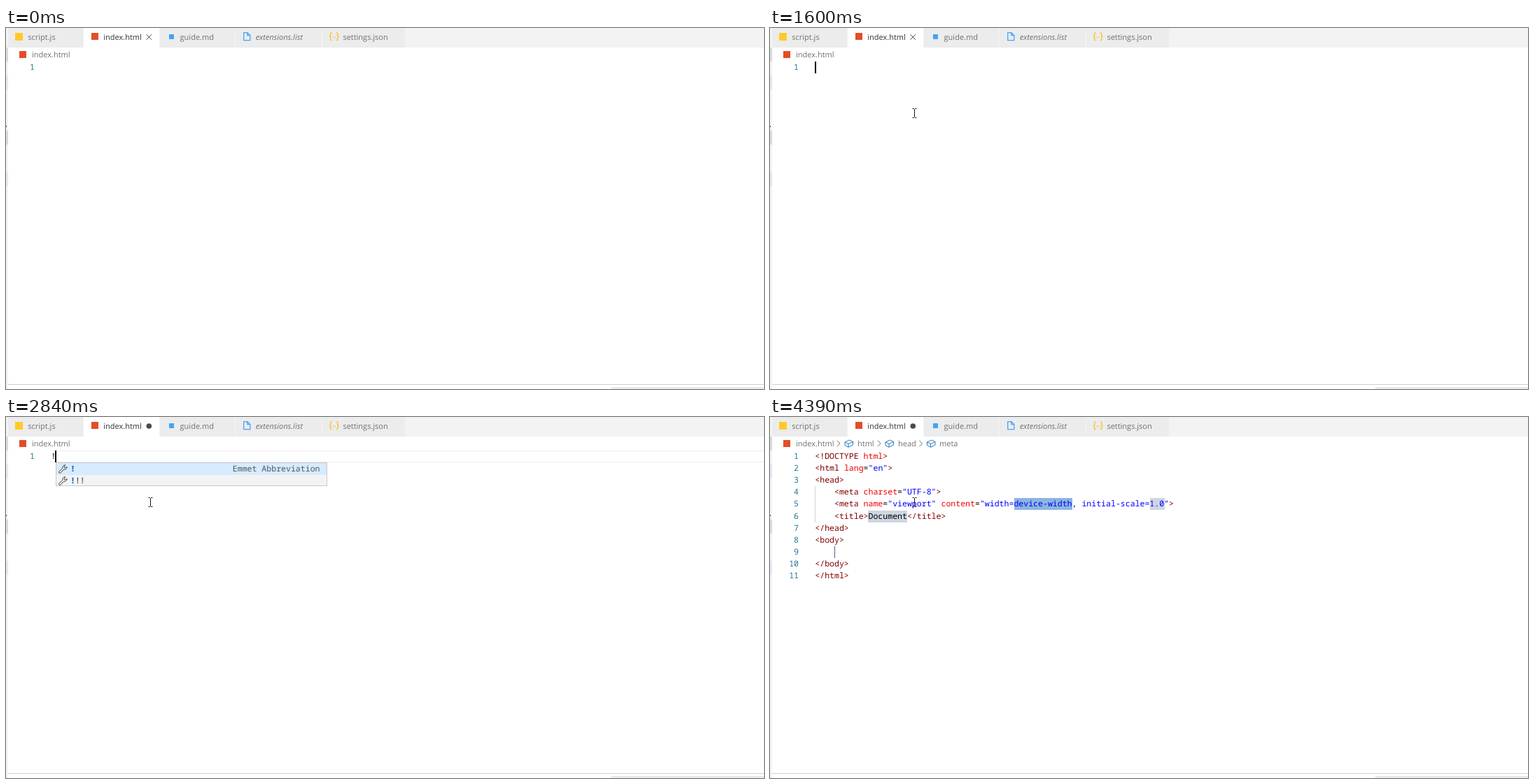
An HTML page that plays this animation: 1083x517 px, repeating every 4480 ms.

```html
<!DOCTYPE html>
<html lang="en">
<head>
<meta charset="UTF-8">
<title>Editor abbreviation</title>
<style>
html, body { margin: 0; width: 100%; height: 100%; overflow: hidden; background: #fff; }
svg { display: block; width: 1083px; height: 517px; }
text { text-rendering: geometricPrecision; white-space: pre; }
.ui { font: 11px "Open Sans", "Noto Sans", sans-serif; fill: #717171; }
.ui .on { fill: #333; }
.mono { font: 11.55px "Noto Sans Mono", "DejaVu Sans Mono", monospace; }
.nums { fill: #237893; text-anchor: end; }
.line { fill: none; stroke: #424242; }

.loop, .code text, .code tspan { animation: 4480ms step-end infinite; }
.caret { animation-name: caret; }
.pointer { animation-name: pointer; }
.click { animation-name: click; }
.close { animation-name: close; }
.dirty { animation-name: dirty; }
.typed { animation-name: typed; }
.suggest { animation-name: suggest; }
.page { animation-name: page; }
.crumbs { animation-name: crumbs; }

/* code is black until the highlighter catches up */
.code text, .code tspan { animation-name: tint; fill: var(--c); }
.code text { --c: #800000; }
.code .a { --c: #f00000; }
.code .v { --c: #0000ff; }
.code .p { --c: #000; }
@keyframes tint { 0% { fill: #000; } 89.5% { fill: var(--c); } }

@keyframes caret {
  0% { visibility: hidden; transform: translate(64px, 48px); }
  27.23% { visibility: visible; transform: translate(64px, 48px); }
  37.72% { visibility: hidden; transform: translate(64px, 48px); }
  49.99% { visibility: visible; transform: translate(64px, 48px); }
  60.26% { visibility: visible; transform: translate(70px, 48px); }
  72.54% { visibility: hidden; transform: translate(70px, 48px); }
  82.81% { visibility: visible; transform: translate(70px, 48px); }
  87.94% { visibility: visible; transform: translate(431px, 116px); }
  97.99%, 100% { visibility: hidden; transform: translate(431px, 116px); }
}
@keyframes pointer {
  0% { visibility: hidden; transform: translate(903px, 488px); }
  4.91% { visibility: visible; transform: translate(903px, 488px); }
  6.47% { transform: translate(700px, 394px); }
  8.25% { transform: translate(530px, 322px); }
  9.82% { transform: translate(469px, 299px); }
  16.96% { transform: translate(446px, 282px); }
  18.52% { transform: translate(385px, 238px); }
  20.31% { transform: translate(311px, 188px); }
  22.09% { transform: translate(252px, 150px); }
  23.66% { transform: translate(216px, 128px); }
  25.44% { transform: translate(203px, 121px); }
  35.71%, 100% { visibility: visible; transform: translate(207px, 122px); }
}
@keyframes click { 0% { visibility: hidden; } 27.23% { visibility: visible; } 29.01%, 100% { visibility: hidden; } }
@keyframes close { 0% { visibility: visible; } 60.26%, 100% { visibility: hidden; } }
@keyframes dirty { 0% { visibility: hidden; } 60.26%, 100% { visibility: visible; } }
@keyframes typed { 0% { visibility: hidden; } 60.26% { visibility: visible; } 87.94%, 100% { visibility: hidden; } }
@keyframes suggest { 0% { visibility: hidden; } 63.39% { visibility: visible; } 87.94%, 100% { visibility: hidden; } }
@keyframes page { 0% { visibility: hidden; } 87.94%, 100% { visibility: visible; } }
@keyframes crumbs { 0% { visibility: hidden; } 96.2%, 100% { visibility: visible; } }
</style>
</head>
<body>
<svg viewBox="0 0 1083 517">
  <defs>
    <path id="wrench" class="line" stroke-linejoin="round" d="M.8 10.2 5.9 5.2C5.2 2.6 7.4.3 10 .9L8 3l.4 1.7 1.7.4L12 3.2C12.5 5.7 10.2 7.8 7.9 7.1L2.8 12.1Q1.7 12.9.9 12 .1 11.1.8 10.2Z"/>
    <g id="crumb">
      <path class="line" style="stroke:#717171" d="M0 33.7 4 38 0 42.3"/>
      <path class="line" style="stroke:#2a7ab8" stroke-linejoin="round" d="M11 36 17.5 33 22.5 35.5V40L16 43.2 11 40.5ZM11 36 16 38.5 22.5 35.5M16 38.5V43.2"/>
    </g>
  </defs>

  <!-- tab bar -->
  <path fill="#f3f3f3" d="M0 0H1083V28H0Z"/>
  <path fill="#ececec" d="M3 0H110V28H3ZM220 0H327V28H220ZM328 0H451V28H328ZM452 0H570V28H452Z"/>
  <path fill="#fff" d="M111 0H219V28H111Z"/>

  <!-- sidebar edge -->
  <path fill="#f3f3f3" d="M0 28H3V517H0Z"/>
  <path fill="#dadada" d="M0 28H3V48H0ZM0 147H3V167H0Z"/>
  <path fill="#e4e6f1" d="M0 68H3V88H0ZM0 206H3V226H0Z"/>
  <path fill="#444" d="M0 140H1V142H0Z"/>

  <!-- bottom panel -->
  <path fill="#cfcfcf" d="M3 510H1083V511H3ZM865 515H1083V516H865Z"/>

  <!-- file icons -->
  <rect x="13" y="7" width="11" height="11" fill="#ffca28"/>
  <rect x="122" y="7" width="10" height="10" fill="#e44d26"/>
  <rect x="19" y="33" width="10" height="10" fill="#e44d26"/>
  <rect x="233" y="9" width="7" height="7" fill="#42a5f5"/>
  <path fill="none" stroke="#42a5f5" stroke-width="1.3" stroke-linejoin="round" d="M339.7 6.7H345L348.8 10.4V17.7H339.7ZM344.8 6.7V10.6H348.8"/>
  <g fill="none" stroke="#fbc02d" stroke-width="1.3">
    <path d="M465.5 7H464.7Q463.7 7 463.7 8.2V10.5Q463.7 12.3 461.8 12.3 463.7 12.3 463.7 14V16.2Q463.7 17.5 464.7 17.5H465.5"/>
    <path d="M472 7H472.8Q473.8 7 473.8 8.2V10.5Q473.8 12.3 475.7 12.3 473.8 12.3 473.8 14V16.2Q473.8 17.5 472.8 17.5H472"/>
    <path stroke-dasharray="1.3 1.5" d="M466.7 13.5H471.5"/>
  </g>

  <g class="ui">
    <text x="31.3" y="17">script.js</text>
    <text x="139.3" y="17" class="on">index.html</text>
    <text x="248.6" y="17">guide.md</text>
    <text x="356.8" y="17" font-style="italic">extensions.list</text>
    <text x="481.4" y="17">settings.json</text>
    <text x="37" y="42">index.html</text>
  </g>
  <path class="line loop close" d="M200.5 9.2 208 16.8M208 9.2 200.5 16.8"/>
  <circle class="loop dirty" cx="204.3" cy="13" r="3.8" fill="#4a4a4a"/>

  <g class="ui loop crumbs">
    <use href="#crumb" x="96"/><text x="125" y="42">html</text>
    <use href="#crumb" x="154"/><text x="183" y="42">head</text>
    <use href="#crumb" x="213.5"/><text x="242" y="42">meta</text>
  </g>

  <text class="mono nums" x="41" y="60">1</text>

  <!-- typed abbreviation -->
  <g class="mono loop typed">
    <path fill="#ececec" d="M64 48H1083V49H64ZM64 64H1083V65H64Z"/>
    <text x="64.3" y="60">!</text>
  </g>
  <g class="mono loop suggest">
    <rect x="71.5" y="65.5" width="387" height="33" fill="#f3f3f3" stroke="#c8c8c8"/>
    <rect x="72" y="66" width="386" height="17" fill="#d6ebff"/>
    <use href="#wrench" x="75" y="68"/>
    <use href="#wrench" x="75" y="85"/>
    <g fill="#0066bf" font-weight="700"><text x="92" y="78">!</text><text x="92" y="95">!</text></g>
    <text x="98.9" y="95" fill="#333">!!</text>
    <text x="448.5" y="78" text-anchor="end" fill="#555">Emmet Abbreviation</text>
  </g>

  <!-- expanded document -->
  <g class="mono loop page">
    <path fill="#d3d3d3" d="M64 99H65V151H64Z"/>
    <path fill="#8cb5e0" d="M349 116H432V133H349Z"/>
    <path fill="#ced6e0" d="M543 116H564V133H543ZM140 134H196V151H140Z"/>
    <path fill="#4a6580" d="M92 185H93V202H92Z"/>
    <g class="nums">
      <text x="41" y="77">2</text><text x="41" y="94">3</text>
      <text x="41" y="111">4</text><text x="41" y="128">5</text>
      <text x="41" y="146">6</text><text x="41" y="163">7</text>
      <text x="41" y="180">8</text><text x="41" y="197">9</text>
      <text x="41" y="214">10</text><text x="41" y="231">11</text>
    </g>
    <g class="code">
      <text x="64.3" y="60">&lt;!DOCTYPE <tspan class="a">html</tspan>&gt;</text>
      <text x="64.3" y="77">&lt;html <tspan class="a">lang</tspan><tspan class="p">=</tspan><tspan class="v">"en"</tspan>&gt;</text>
      <text x="64.3" y="94">&lt;head&gt;</text>
      <text x="92" y="111">&lt;meta <tspan class="a">charset</tspan><tspan class="p">=</tspan><tspan class="v">"UTF-8"</tspan>&gt;</text>
      <text x="92" y="128">&lt;meta <tspan class="a">name</tspan><tspan class="p">=</tspan><tspan class="v">"viewport"</tspan> <tspan class="a">content</tspan><tspan class="p">=</tspan><tspan class="v">"width=device-width, initial-scale=1.0"</tspan>&gt;</text>
      <text x="92" y="146">&lt;title&gt;<tspan class="p">Document</tspan>&lt;/title&gt;</text>
      <text x="64.3" y="163">&lt;/head&gt;</text>
      <text x="64.3" y="180">&lt;body&gt;</text>
      <text x="64.3" y="214">&lt;/body&gt;</text>
      <text x="64.3" y="231">&lt;/html&gt;</text>
    </g>
  </g>

  <rect class="loop caret" width="2" height="17"/>
  <circle class="loop click" cx="201" cy="120" r="10.7" fill="#ffff80"/>
  <path class="loop pointer" fill="none" stroke="#111" d="M-3.5-6.5H-1.5L-.5-5.5.5-6.5H2.5M-.5-5.5V5.5M-3.5 6.5H-1.5L-.5 5.5.5 6.5H2.5"/>
</svg>
</body>
</html>
```
